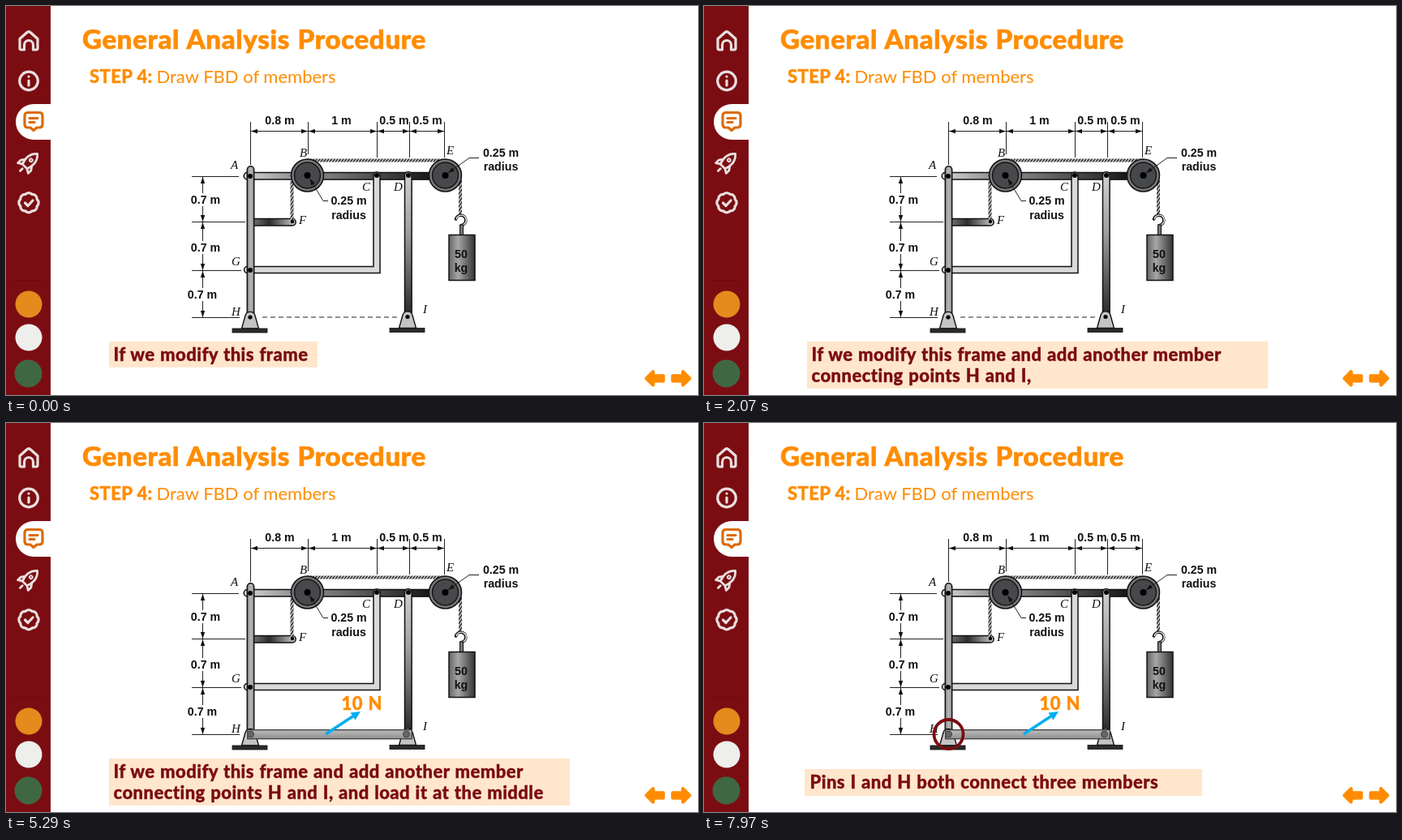
Animation of 853 by 480 pixels, one loop 8 s. Source, as an HTML page:

```html
<!DOCTYPE html>
<html lang="en">
<head>
<meta charset="utf-8">
<title>General Analysis Procedure</title>
<style>
  html, body { margin: 0; width: 100%; height: 100%; overflow: hidden; background: #fff; }
  svg { display: block; width: 100vw; height: 100vh; }
  text { white-space: pre; }
  .head { font-family: Lato, "Open Sans", sans-serif; font-weight: 800; fill: #ff8c00; stroke: #ff8c00; stroke-width: .4; }
  .title { font-size: 33px; letter-spacing: .68px; word-spacing: 1px; stroke-width: .7; }
  .step { font-size: 22px; letter-spacing: .4px; }
  .thin { font-weight: 400; letter-spacing: 0; stroke: none; }
  .note { font-size: 22px; letter-spacing: .45px; word-spacing: .8px; }
  .maroon { fill: #7b0c11; stroke: #7b0c11; }
  .dim { font: bold 14.2px "Liberation Sans", Arial, sans-serif; fill: #111; }
  .mid { text-anchor: middle; }
  .pt { font: italic 15px "Liberation Serif", "Times New Roman", serif; fill: #111; }
  .icon { fill: none; stroke: #eadfdf; stroke-width: 3.2; stroke-linecap: round; stroke-linejoin: round; }
  .line { fill: none; stroke: #222; stroke-width: 1; }
  .bar { stroke: #111; stroke-width: 1.5; }
  .box { fill: #ffe6cc; }

  /* Scenes change without fades */
  .scene, .add, .member, .load, .pins { animation: 8s step-end infinite; }
  .scene { animation-name: scene; }
  .add { animation-name: add; }
  .member { animation-name: member; }
  .load { animation-name: load; }
  .pins { animation-name: pins; }
  @keyframes scene { 0% { opacity: 1 } 99.625%, 100% { opacity: 0 } }
  @keyframes add { 0% { visibility: hidden } 15.875%, 100% { visibility: visible } }
  @keyframes member { 0% { visibility: hidden } 32.625%, 100% { visibility: visible } }
  @keyframes load { 0% { visibility: hidden } 66.125%, 100% { visibility: visible } }
  @keyframes pins { 0% { visibility: hidden } 99.625%, 100% { visibility: visible } }
</style>
</head>
<body>
<svg viewBox="0 0 853 480" preserveAspectRatio="none">
  <defs>
    <marker id="tip" viewBox="0 0 8 6" refX="8" refY="3" markerWidth="8" markerHeight="6" markerUnits="userSpaceOnUse" orient="auto-start-reverse">
      <path d="M0 0.3L8 3L0 5.7Z" fill="#111"/>
    </marker>
    <pattern id="rope" width="3" height="3" patternUnits="userSpaceOnUse" patternTransform="rotate(35)">
      <rect width="3" height="3" fill="#222"/><rect width="1.3" height="3" fill="#eee"/>
    </pattern>
    <linearGradient id="post"><stop stop-color="#858585"/><stop offset=".5" stop-color="#b8b8b8"/><stop offset="1" stop-color="#909090"/></linearGradient>
    <linearGradient id="left"><stop stop-color="#d8d8d8"/><stop offset="1" stop-color="#8a8a8a"/></linearGradient>
    <linearGradient id="right"><stop stop-color="#858585"/><stop offset="1" stop-color="#151515"/></linearGradient>
    <linearGradient id="stub"><stop stop-color="#777"/><stop offset=".4" stop-color="#2c2c2c"/><stop offset="1" stop-color="#ccc"/></linearGradient>
    <linearGradient id="leg" x2="0" y2="1"><stop stop-color="#d2d2d2"/><stop offset=".4" stop-color="#a0a0a0"/><stop offset="1" stop-color="#262626"/></linearGradient>
    <linearGradient id="mass"><stop stop-color="#666"/><stop offset=".35" stop-color="#a6a6a6"/><stop offset="1" stop-color="#333"/></linearGradient>
    <linearGradient id="beam" x2="0" y2="1"><stop stop-color="#bdbdbd"/><stop offset="1" stop-color="#8f8f8f"/></linearGradient>
    <g id="pulley">
      <circle r="20" fill="#777" stroke="#111" stroke-width="1.5"/>
      <circle r="16" fill="#47484b" stroke="#161616" stroke-width="1.5"/>
      <circle r="4" fill="#000"/>
    </g>
    <g id="support">
      <path d="M-10.5 14L-6 -2A6.2 6.2 0 0 1 6 -2L10.5 14Z" fill="#c4c4c4" stroke="#111" stroke-width="1.4"/>
      <rect x="-22" y="14" width="43" height="5" fill="#2b2b2b" stroke="#111" stroke-width=".8"/>
      <circle r="2.6" fill="#000"/>
    </g>
    <path id="arrow" d="M2.5 10.5L10.5 2.5V7.500H23V13.500H10.500V18.500Z" fill="#ff8c00" stroke="#ff8c00" stroke-width="4.500" stroke-linejoin="round"/>
  </defs>

  <rect width="853" height="480" fill="#fff"/>

  <!-- Sidebar -->
  <rect width="55" height="480" fill="#7b0d12"/>
  <path d="M8 338.500H47" stroke="#6c0b10"/>
  <path d="M55 121H34a22 22 0 0 0 0 44H55Z" fill="#fff"/>
  <g class="icon">
    <path d="M17 40.500L26 32.500Q28 31 30 32.500L39 40.500V52Q39 54 37 54H33.500V48a5.500 5.500 0 0 0-11 0V54H19Q17 54 17 52Z"/>
    <circle cx="28" cy="92.500" r="11.300"/>
    <path d="M28 92V98M28 87v.1"/>
    <g transform="translate(28 193) rotate(45)">
      <path d="M0-15C7-9 7-1 4 7H-4C-7-1-7-9 0-15ZM-5.500 0L-9 5V10L-4 7M5.500 0L9 5V10L4 7M0 11V15" stroke-width="2.800"/>
      <circle cy="-4" r="1.800" stroke-width="2"/>
    </g>
    <path d="M23.800 232.500a5.500 5.500 0 0 1 8.400 0a5.500 5.500 0 0 1 6 6a5.500 5.500 0 0 1 0 8.400a5.500 5.500 0 0 1-6 6a5.500 5.500 0 0 1-8.400 0a5.500 5.500 0 0 1-6-6a5.500 5.500 0 0 1 0-8.400a5.500 5.500 0 0 1 6-6Z"/>
    <path d="M23.500 243L27 246.500L33 240"/>
    <path d="M27 131.500H41Q45 131.500 45 135.500V146Q45 150 41 150H38L34 153.500L30 150H27Q23 150 23 146V135.500Q23 131.500 27 131.500ZM29 138.500H39M29 143.500H35" stroke="#dc6b08"/>
  </g>
  <circle cx="28" cy="368" r="16.500" fill="#e58a1d"/>
  <circle cx="28" cy="409" r="16.500" fill="#eeeeec"/>
  <circle cx="27.500" cy="453.500" r="17" fill="#3f6842"/>

  <!-- Headings -->
  <text class="head title" x="94" y="53">General Analysis Procedure</text>
  <text class="head step" x="103" y="95">STEP 4:</text>
  <text class="head step thin" x="185.500" y="95">Draw FBD of members</text>

  <!-- Dimensions -->
  <path class="line" d="M301.500 143V196M372.500 143V183M457.500 143V187M497.500 143V187M540.500 143V187M229 210.500H287M229 266.500H295M229 326.500H290M229 384.500H288"/>
  <g class="line" marker-start="url(#tip)" marker-end="url(#tip)">
    <path d="M302 154.500H372"/>
    <path d="M373 154.500H457"/>
    <path d="M458 154.500H497"/>
    <path d="M498 154.500H540"/>
    <path d="M242.500 211V266"/>
    <path d="M242.500 267V326"/>
    <path d="M242.500 327V384"/>
  </g>
  <path d="M226 231h40v16h-40ZM226 290h40v16h-40ZM222 348h40v16h-40Z" fill="#fff"/>
  <g class="dim mid">
    <text x="337.500" y="146">0.8 m</text>
    <text x="413.500" y="146">1 m</text>
    <text x="478.500" y="146">0.5 m</text>
    <text x="519.500" y="146">0.5 m</text>
    <text x="246" y="244">0.7 m</text>
    <text x="246" y="303">0.7 m</text>
    <text x="242" y="361">0.7 m</text>
    <text x="610" y="186">0.25 m</text>
    <text x="610" y="203">radius</text>
    <text x="422.500" y="245">0.25 m</text>
    <text x="422.500" y="263">radius</text>
  </g>

  <!-- Frame -->
  <path class="line" d="M316 384H484" stroke-dasharray="6 4"/>
  <path class="bar" d="M305 205.500H297.500a4.300 4.300 0 0 0 0 8.600H360V205.500Z" fill="url(#left)"/>
  <rect class="bar" x="385" y="205.500" width="140" height="8.600" fill="url(#right)"/>
  <path class="bar" d="M303 262.500H353a4.200 4.200 0 0 1 0 8.400H303Z" fill="url(#stub)"/>
  <path class="bar" d="M297.500 321.500H453V209a4 4 0 0 1 8 0V329.500H297.500a4 4 0 0 1 0-8Z" fill="#d9d9d9"/>
  <path class="bar" d="M491.500 384V209a4.300 4.300 0 0 1 8.600 0V384Z" fill="url(#leg)"/>
  <path class="bar" d="M297.300 384V202a4.200 4.200 0 0 1 8.400 0V384Z" fill="url(#post)"/>
  <use href="#support" x="301" y="384"/>
  <use href="#support" x="495" y="383.500"/>
  <g>
    <circle cx="301" cy="210" r="3"/><circle cx="301" cy="326" r="3"/>
    <circle cx="457" cy="209" r="3"/><circle cx="496" cy="209" r="3"/><circle cx="353" cy="266" r="2.200"/>
  </g>
  <g fill="none" stroke="url(#rope)" stroke-width="4">
    <path d="M371 190.500H541M352.500 209V264M560 209V257"/>
  </g>
  <use href="#pulley" x="371.500" y="209"/>
  <use href="#pulley" x="541.500" y="209"/>
  <path class="line" d="M397 240.500H391L374.500 213" marker-end="url(#tip)"/>
  <path class="line" d="M583 187.500H571L545 206" marker-end="url(#tip)"/>
  <path d="M554.500 263A6.200 6.200 0 1 1 561.500 270.500" fill="none" stroke="#111" stroke-width="3.600" stroke-linecap="round"/>
  <path d="M555 263A6.200 6.200 0 1 1 561.500 270.500" fill="none" stroke="#eee" stroke-width="1.400"/>
  <rect x="559.500" y="270" width="4" height="13" fill="#777" stroke="#111"/>
  <rect class="bar" x="546" y="282.500" width="32" height="56" fill="url(#mass)"/>
  <g class="dim mid"><text x="561" y="311">50</text><text x="561" y="328">kg</text></g>
  <g class="pt">
    <text x="277" y="201">A</text><text x="362" y="186">B</text><text x="439" y="228">C</text>
    <text x="478" y="228">D</text><text x="543" y="183">E</text><text x="361" y="269">F</text>
    <text x="278" y="320">G</text><text x="278" y="382">H</text><text x="514" y="379">I</text>
  </g>

  <!-- Added member and its load -->
  <g class="member">
    <rect x="297.700" y="378.700" width="202.600" height="11" fill="url(#beam)" stroke="#444" stroke-width="1.400"/>
    <g fill="#666" stroke="#444"><circle cx="301.500" cy="384" r="4"/><circle cx="493.500" cy="384" r="4"/></g>
  </g>
  <g class="load">
    <path d="M394 384L429 361" stroke="#00aeef" stroke-width="3.500"/>
    <path d="M437 356L430.500 366.500L424.500 357.500Z" fill="#00aeef"/>
    <text class="head note" x="413.500" y="354">10 N</text>
  </g>
  <circle class="pins" cx="301.500" cy="384" r="18" fill="none" stroke="#7b0c11" stroke-width="3.800"/>

  <!-- Captions -->
  <g class="scene">
    <rect class="box" x="127" y="414" width="257" height="32"/>
    <rect class="box add" x="127" y="414" width="568" height="58"/>
    <text class="head note maroon" x="132.500" y="438">If we modify this frame<tspan class="add"> and add another member</tspan></text>
    <text class="head note maroon" x="132.500" y="464"><tspan class="add">connecting points H and I,</tspan><tspan class="load"> and load it at the middle</tspan></text>
  </g>
  <g class="pins">
    <rect class="box" x="124" y="427" width="490" height="33"/>
    <text class="head note maroon" x="130.500" y="451">Pins I and H both connect three members</text>
  </g>

  <!-- Page arrows -->
  <use href="#arrow" x="787" y="449"/>
  <use href="#arrow" transform="translate(845 449) scale(-1 1)"/>
</svg>
</body>
</html>
```
